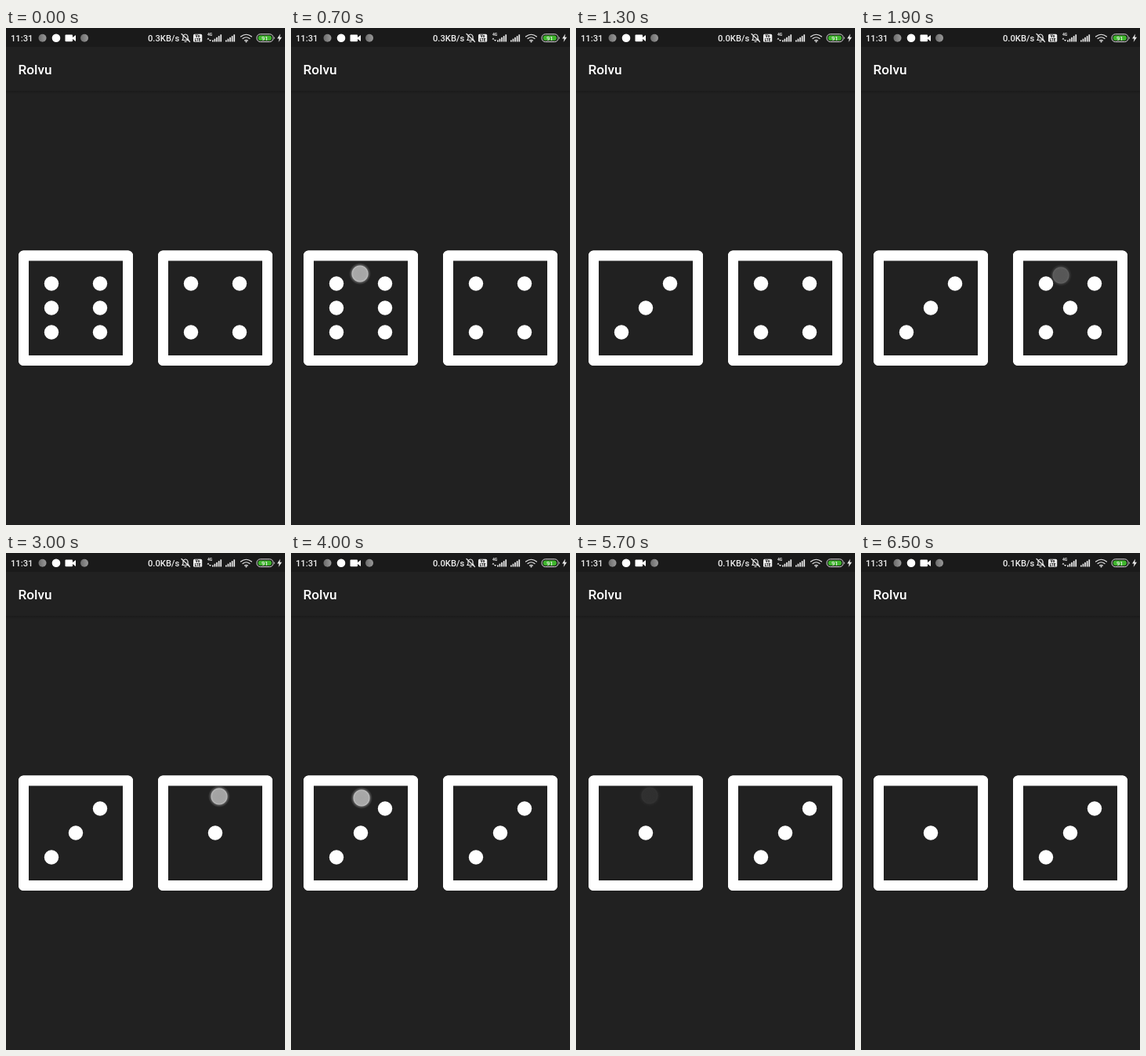
Animation of 356 by 633 pixels, one loop 6600 ms. Source, as an HTML page:

```html
<!DOCTYPE html>
<html lang="en">
<head>
<meta charset="utf-8">
<title>Dice roller</title>
<style>
  html, body { margin: 0; width: 100%; height: 100%; overflow: hidden; background: #212121; }
  svg { display: block; width: 100%; height: 100%; }
  text { font-family: Roboto, sans-serif; font-weight: 500; fill: #fff; }
  .status text { font-size: 11.2px; fill: #eee; }
  .status .tiny { font-size: 5px; font-weight: 700; }
  .status .label { font-size: 4.6px; font-weight: 800; fill: #1a1a1a; text-anchor: middle; }
  .line { fill: none; stroke: #e8e8e8; stroke-width: 1.2; stroke-linecap: round; }
  .die rect { fill: none; stroke: #fff; stroke-width: 13; }
</style>
</head>
<body>
<svg viewBox="0 0 356 633">
  <defs>
    <radialGradient id="glow">
      <stop offset="0" stop-color="#d4d4d4"/>
      <stop offset=".6" stop-color="#d8d8d8"/>
      <stop offset=".72" stop-color="#f2f2f2"/>
      <stop offset=".8" stop-color="#bbb" stop-opacity=".45"/>
      <stop offset="1" stop-color="#999" stop-opacity="0"/>
    </radialGradient>
    <linearGradient id="shade" x2="0" y2="1">
      <stop offset="0" stop-color="#1b1b1b"/>
      <stop offset="1" stop-color="#212121"/>
    </linearGradient>
    <linearGradient id="ball">
      <stop offset="0" stop-color="#6c6c6c"/>
      <stop offset="1" stop-color="#999"/>
    </linearGradient>
  </defs>

  <rect width="356" height="633" fill="#212121"/>
  <rect y="80" width="356" height="4" fill="url(#shade)"/>
  <rect width="356" height="24" fill="#1a1a1a"/>

  <g class="status" fill="#eee">
    <text x="6" y="17">11:31</text>
    <circle cx="46.5" cy="12.7" r="5" fill="url(#ball)"/>
    <circle cx="64" cy="12.7" r="5.3" fill="#fff"/>
    <rect x="75.5" y="8.5" width="9.5" height="8.8" rx="1" fill="#fff"/>
    <path d="M85 12l4-3v8l-4-3z" fill="#fff"/>
    <circle cx="100" cy="12.7" r="5" fill="url(#ball)"/>
    <text id="speed" x="181" y="17">0.3KB/s</text>
    <path class="line" d="M225 15.5h8l-1-2v-3q-1-2.5-3-2.5t-3 2.5v3zM228 17.5h2M224 7.5l10.5 10"/>
    <rect x="239" y="7.8" width="11.2" height="10" rx="1.6"/>
    <text class="label" x="244.6" y="12.3">Vo</text>
    <text class="label" x="244.6" y="16.8">LTE</text>
    <text class="tiny" x="257" y="10">4G</text>
    <path d="M256.5 14.5l1.5-2 1.5 2zM259 15l1.5 2 1.5-2z"/>
    <g id="signals"></g>
    <path class="line" stroke-width="1.6" d="M299.5 11q7-5.5 14 0M302 13.5q4.5-3.5 9 0M304.5 16q2-1.5 4 0"/>
    <circle cx="306.5" cy="17.3" r="1.1"/>
    <rect x="320" y="7.8" width="21" height="9.8" rx="4.5" fill="none" stroke="#ddd"/>
    <rect x="321.7" y="9.5" width="17.2" height="6.4" rx="3" fill="#3fb62d"/>
    <path d="M342 11q1.5 1.7 0 3.4z"/>
    <text x="330.2" y="15.5" text-anchor="middle" style="font-size:7.5px">91</text>
    <path d="M350 7.5l-4 6h2.6l-1 4.5 4.4-6.2h-2.7z"/>
  </g>

  <text x="15.5" y="58.5" font-size="17.2">Rolvu</text>

  <g class="die" transform="translate(16 283.5)"><rect x="6.5" y="6.5" width="133" height="133.5"/></g>
  <g class="die" transform="translate(194 283.5)"><rect x="6.5" y="6.5" width="133" height="133.5"/></g>
  <circle id="touch" r="14" fill="url(#glow)" opacity="0"/>
</svg>

<script>
const LOOP = 6600, STEP = 100;
const FIRST_ROLL = [6, 4];
const ROLL_DELAY = 300;
const FADE = [0.4, 0.72, 0.74, 0.3, 0.08];

const taps = [
  { start: 500, x: 88, y: 313, roll: [3, 4] },
  { start: 1600, x: 255, y: 315, roll: [3, 5] },
  { start: 2300, x: 88, y: 313, roll: [3, 1] },
  { start: 2900, x: 272, y: 310, roll: [3, 3] },
  { start: 3800, x: 90, y: 312, roll: [5, 1] },
  { start: 4700, x: 274, y: 319, roll: [5, 4] },
  { start: 5300, x: 94, y: 309, roll: [1, 3] }
];

const SVG = "http://www.w3.org/2000/svg";
function add(parent, name, attrs) {
  const node = document.createElementNS(SVG, name);
  for (const key in attrs) node.setAttribute(key, attrs[key]);
  return parent.appendChild(node);
}

// Each pip lists the die values that show it.
const PIPS = [
  [42, 42, "456"], [104, 42, "23456"],
  [42, 73, "6"], [73, 73, "135"], [104, 73, "6"],
  [42, 104, "23456"], [104, 104, "456"]
];

const dice = [...document.querySelectorAll(".die")].map(die => {
  // Rounds the outer corners while the inner ones stay square.
  add(die, "rect", { x: 1, y: 1, width: 144, height: 144.5, rx: 5, style: "stroke-width:2" });
  die.firstElementChild.setAttribute("stroke-linejoin", "round");
  return PIPS.map(([cx, cy, values]) => ({
    node: add(die, "circle", { cx, cy, r: 9.2, fill: "#fff" }), values
  }));
});

const signals = document.getElementById("signals");
for (const left of [263, 280]) {
  for (let i = 0; i < 5; i++) {
    const height = 2 + i * 1.8;
    add(signals, "rect", { x: left + i * 2.6, y: 17.5 - height, width: 1.7, height });
  }
}

const touch = document.getElementById("touch");
const speed = document.getElementById("speed");

function speedAt(t) {
  return t < 1200 ? "0.3KB/s" : t < 5000 ? "0.0KB/s" : "0.1KB/s";
}

function render(t) {
  const rolled = taps.filter(tap => t >= tap.start + ROLL_DELAY).pop();
  const values = rolled ? rolled.roll : FIRST_ROLL;
  dice.forEach((pips, i) => pips.forEach(pip =>
    pip.node.setAttribute("visibility", pip.values.includes(values[i]) ? "visible" : "hidden")));

  const tap = taps.filter(tap => t >= tap.start).pop();
  const alpha = tap && FADE[Math.floor((t - tap.start) / STEP)] || 0;
  touch.setAttribute("opacity", alpha);
  if (alpha) touch.setAttribute("transform", `translate(${tap.x} ${tap.y})`);

  speed.textContent = speedAt(t);
}

const begin = performance.now();
function tick() {
  render((performance.now() - begin) % LOOP);
  requestAnimationFrame(tick);
}
tick();
</script>
</body>
</html>
```
